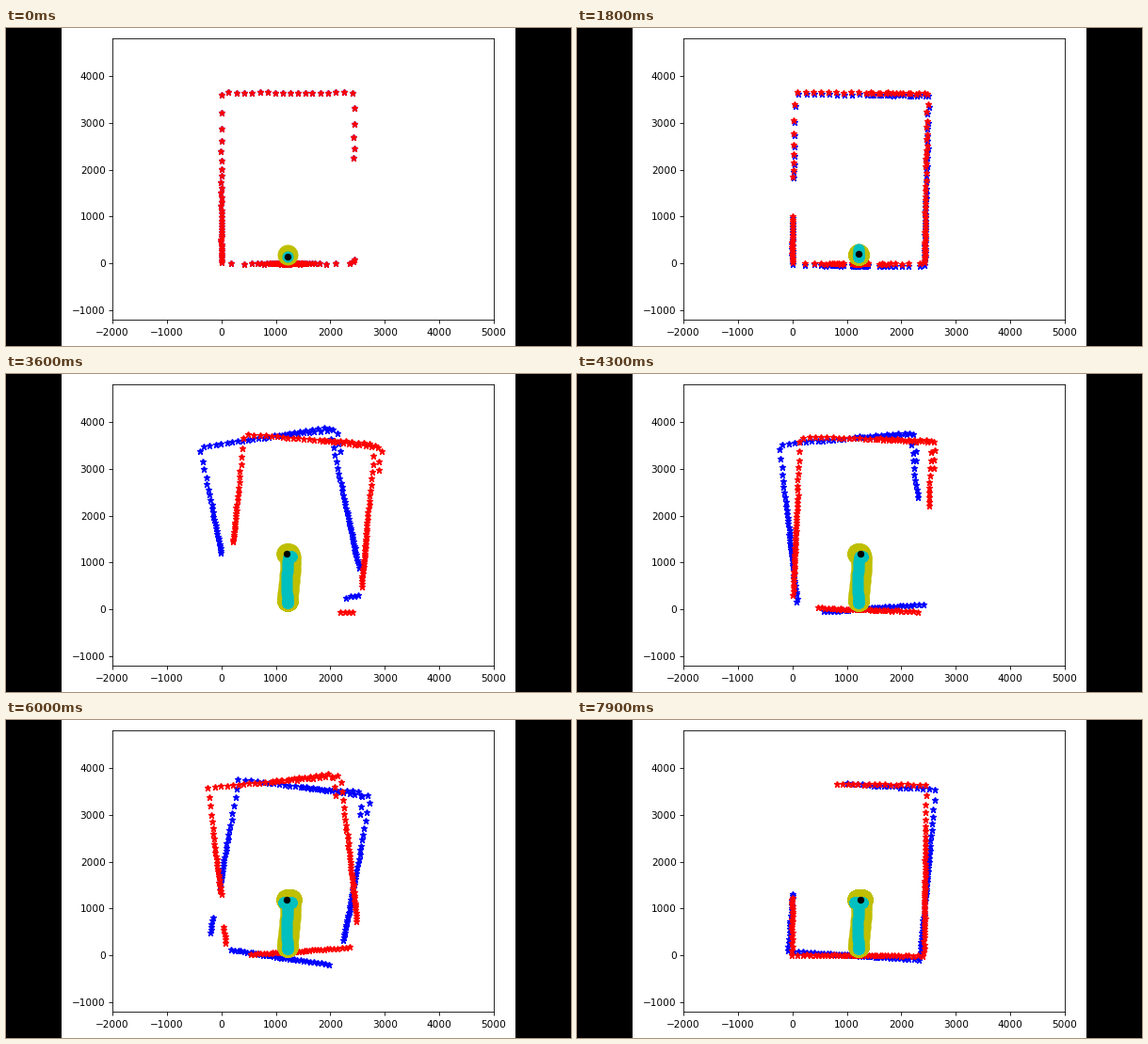
These frames come from a looping animation (600x338 px, 8 s). A matplotlib script:

```python
import numpy as np
import matplotlib.pyplot as plt
from matplotlib.animation import FuncAnimation
from matplotlib.patches import Rectangle

FRAMES, STEP_MS = 80, 100
W, H = 600, 338
ROOM = np.array([2430, 3645])
RAY_STEP = 2.25
CLIMB = 14  # frames the robot needs for its drive
S = 0.753   # scale of fonts, lines and markers

# Key points: frame, turn of the raw scan, tilt of the matched scan,
# first angle and span of the sweep
SWEEP = np.array([
    (0, 0, 0, 60, 298),
    (18, -0.3, -0.55, 147, 342),
    (28, 0, -0.5, 110, 300),
    (36, 15, -4.6, -54, 228),
    (50, 0.2, 0.4, 137, 322),
    (60, -14.5, 5.3, 206, 327),
    (71, -6, -1, 290, 322),
    (79, -4, -0.45, 179, 283),
]).T


def ease(u):
    u = np.clip(u, 0, 1)
    return u * u * (3 - 2 * u)


def drive(t, start, base, top, x, period, phase, swing):
    """Climb from base to top, swaying around x after the start."""
    k = ease((t - start) / CLIMB)
    sway = x + swing * np.sin(2 * np.pi * (t - phase) / period)
    return np.column_stack([1217 + k * (sway - 1217), base + k * (top - base)])


def robot_path(t):
    return drive(t, 16, 150, 1195, 1245, 24, 43, 45)


def outer_path(t):
    return drive(t, 17, 180, 1190, 1240, 24, 43, 45)


def inner_path(t):
    return drive(t, 14.4, 150, 1135, 1210, 48, 24, 70)


def rotate(v, deg):
    a = np.radians(deg)
    c, s = np.cos(a), np.sin(a)
    return np.column_stack([v[:, 0] * c - v[:, 1] * s,
                            v[:, 0] * s + v[:, 1] * c])


def cast(p, deg):
    """Vectors from p to the walls of the room."""
    a = np.radians(deg)
    d = np.column_stack([np.cos(a), np.sin(a)]) + 1e-9
    return d * (np.where(d > 0, ROOM - p, -p) / d).min(axis=1)[:, None]


def scan(i):
    """Matched and raw scan points seen by the robot."""
    rng = np.random.default_rng(100 + i)
    turn, tilt, first, span = (np.interp(i, SWEEP[0], c) for c in SWEEP[1:])
    before, p = robot_path(np.array([i - 1, i]))

    angles = np.arange(first, first + span, RAY_STEP)
    tilts = tilt * np.linspace(0.8, 1.2, len(angles))
    if abs(tilt) >= 0.5:
        # Rough scans lose two sectors and see one sector twice
        a = angles % 360
        seen = (abs(a - 228) > 9) & (abs(a - 322) > 9)
        again = np.arange(58, 88, RAY_STEP)
        angles = np.append(angles[seen], again)
        tilts = np.append(tilts[seen], np.full(len(again), 1.7 * tilt))

    rel = rotate(cast(p, angles), tilts) + rng.normal(0, 5, (len(angles), 2))
    slip = (turn / 15) ** 2
    if turn > 0:
        fix, skid = (195, 0), (0, 65)
    else:
        fix, skid = (0, 85), (-76, -33)
    matched = p + rel + slip * np.array(fix)
    raw = before + rotate(rel, turn) + slip * np.array(skid)
    return matched, raw


fig = plt.figure(figsize=(W / 100, H / 100), dpi=100, facecolor="black")
fig.add_artist(Rectangle((59 / W, 0), 482 / W, 1, color="white", lw=0,
                         transform=fig.transFigure, zorder=-1))
ax = fig.add_axes([113 / W, 28 / H, 405 / W, 299 / H])
ax.set(xlim=(-2000, 5000), ylim=(-1200, 4800),
       xticks=range(-2000, 5001, 1000), yticks=range(-1000, 4001, 1000))
ax.tick_params(labelsize=10 * S, length=3.5 * S, width=0.8 * S, pad=3.5 * S)
ax.tick_params(axis="x", pad=5.2 * S)
for spine in ax.spines.values():
    spine.set_linewidth(0.8 * S)


def markers(fmt, size, edge=1):
    return ax.plot([], [], fmt, ms=size * S, mew=edge * S)[0]


blue, red = markers("b*", 6.3, 1.3), markers("r*", 6.3, 1.3)
outer, inner = markers("yo", 20), markers("co", 10.5)
robot = markers("ko", 6)


def draw(i):
    matched, raw = scan(i)
    past = np.arange(0, i + 0.1, 0.5)
    red.set_data(*matched.T)
    blue.set_data(*raw.T)
    outer.set_data(*outer_path(past).T)
    inner.set_data(*inner_path(past).T)
    robot.set_data(*robot_path(np.array([i])).T)
    return blue, red, outer, inner, robot


anim = FuncAnimation(fig, draw, frames=FRAMES, interval=STEP_MS,
                     repeat=True, repeat_delay=0)
plt.show()
```
